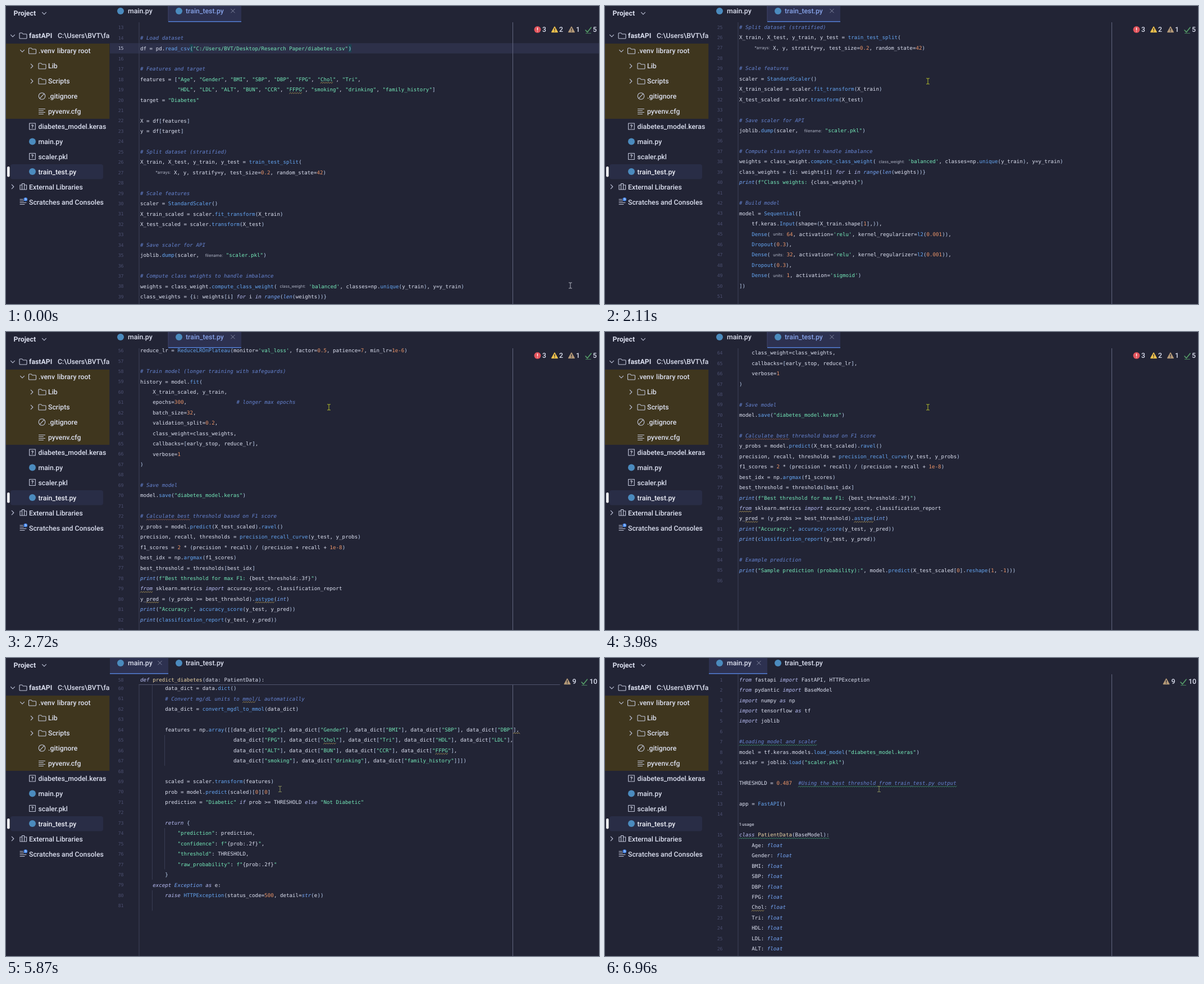
Write an HTML page that moves like this. It is 1056x531 px and loops after 8000 ms.

```html
<!DOCTYPE html>
<html lang="en">
<head>
<meta charset="utf-8">
<title>Code editor</title>
<style>
html, body { margin: 0; width: 100%; height: 100%; overflow: hidden; background: #222435; }
svg { display: block; width: 1056px; height: 531px; }
text { white-space: pre; text-rendering: geometricPrecision; }
.code { font: 9.19px "DejaVu Sans Mono", "Noto Sans Mono", monospace; }
.num { font: 8.2px "DejaVu Sans Mono", "Noto Sans Mono", monospace; text-anchor: end; }
.ui { font: 500 12.3px Roboto, Inter, sans-serif; }
.bold { font-weight: 700; }
.hint { font: 7.3px Inter, sans-serif; }
.usage { font: 600 7.3px Inter, sans-serif; }
.it { font-style: italic; }
</style>
</head>
<body>
<svg id="stage" viewBox="0 0 1056 531"></svg>
<script>
const LOOP = 8000, ROW = 18.44, CW = 5.533, LEFT = 239, TOP = 38.5;
const BG = '#222435', FG = '#dce0f0', LINE = '#50546d';
const INK = { comment: '#6583d0', string: '#74e8b8', number: '#ea9468', key: '#b8bdf4',
  builtin: '#74a5f6', call: '#64a5f2', name: '#ead4a6', bracket: '#bcd0f0', gutter: '#4b4f70' };
const RED = '#d8505c', OCHRE = '#b9a05a', GREEN = '#3f9d72', RUST = '#96604f';
const KEYS = new Set('import from as for in if else return def class try except raise'.split(' '));
const BUILTINS = new Set('print range len float int str Exception'.split(' '));

const TRAIN = `import pandas as pd
import numpy as np
import tensorflow as tf
from tensorflow.keras.models import Sequential
from tensorflow.keras.layers import Dense, Dropout
from tensorflow.keras.regularizers import l2
from tensorflow.keras.callbacks import EarlyStopping, ReduceLROnPlateau
from sklearn.model_selection import train_test_split
from sklearn.preprocessing import StandardScaler
from sklearn.utils import class_weight
import joblib
from sklearn.metrics import precision_recall_curve

# Load dataset
df = pd.read_csv("C:/Users/BVT/Desktop/Research Paper/diabetes.csv")

# Features and target
features = ["Age", "Gender", "BMI", "SBP", "DBP", "FPG", "Chol", "Tri",
            "HDL", "LDL", "ALT", "BUN", "CCR", "FFPG", "smoking", "drinking", "family_history"]
target = "Diabetes"

X = df[features]
y = df[target]

# Split dataset (stratified)
X_train, X_test, y_train, y_test = train_test_split(
    ~*arrays:~X, y, stratify=y, test_size=0.2, random_state=42)

# Scale features
scaler = StandardScaler()
X_train_scaled = scaler.fit_transform(X_train)
X_test_scaled = scaler.transform(X_test)

# Save scaler for API
joblib.dump(scaler, ~filename:~"scaler.pkl")

# Compute class weights to handle imbalance
weights = class_weight.compute_class_weight(~class_weight:~'balanced', classes=np.unique(y_train), y=y_train)
class_weights = {i: weights[i] for i in range(len(weights))}
print(f"Class weights: {class_weights}")

# Build model
model = Sequential([
    tf.keras.Input(shape=(X_train.shape[1],)),
    Dense(~units:~64, activation='relu', kernel_regularizer=l2(0.001)),
    Dropout(0.3),
    Dense(~units:~32, activation='relu', kernel_regularizer=l2(0.001)),
    Dropout(0.3),
    Dense(~units:~1, activation='sigmoid')
])

# Callbacks
early_stop = EarlyStopping(
    monitor='val_loss', patience=15, restore_best_weights=True
)
reduce_lr = ReduceLROnPlateau(monitor='val_loss', factor=0.5, patience=7, min_lr=1e-6)

# Train model (longer training with safeguards)
history = model.fit(
    X_train_scaled, y_train,
    epochs=300,                # longer max epochs
    batch_size=32,
    validation_split=0.2,
    class_weight=class_weights,
    callbacks=[early_stop, reduce_lr],
    verbose=1
)

# Save model
model.save("diabetes_model.keras")

# Calculate best threshold based on F1 score
y_probs = model.predict(X_test_scaled).ravel()
precision, recall, thresholds = precision_recall_curve(y_test, y_probs)
f1_scores = 2 * (precision * recall) / (precision + recall + 1e-8)
best_idx = np.argmax(f1_scores)
best_threshold = thresholds[best_idx]
print(f"Best threshold for max F1: {best_threshold:.3f}")
from sklearn.metrics import accuracy_score, classification_report
y_pred = (y_probs >= best_threshold).astype(int)
print("Accuracy:", accuracy_score(y_test, y_pred))
print(classification_report(y_test, y_pred))

# Example prediction
print("Sample prediction (probability):", model.predict(X_test_scaled[0].reshape(1, -1)))
`;

const MAIN = `from fastapi import FastAPI, HTTPException
from pydantic import BaseModel
import numpy as np
import tensorflow as tf
import joblib

#Loading model and scaler
model = tf.keras.models.load_model("diabetes_model.keras")
scaler = joblib.load("scaler.pkl")

THRESHOLD = 0.487  #Using the best threshold from train_test.py output

app = FastAPI()

class PatientData(BaseModel):
${'Age Gender BMI SBP DBP FPG Chol Tri HDL LDL ALT BUN CCR FFPG smoking drinking family_history'
  .split(' ').map(f => `    ${f}: float`).join('\n')}


def convert_mgdl_to_mmol(data):
    # Glucose
    if data["FPG"] > 30:
        data["FPG"] = data["FPG"] / 18.0
    if data["FFPG"] > 30:
        data["FFPG"] = data["FFPG"] / 18.0

    # Cholesterol
    if data["Chol"] > 20:
        data["Chol"] = data["Chol"] / 38.67
    if data["HDL"] > 10:
        data["HDL"] = data["HDL"] / 38.67
    if data["LDL"] > 15:
        data["LDL"] = data["LDL"] / 38.67

    # Triglycerides
    if data["Tri"] > 20:
        data["Tri"] = data["Tri"] / 88.57

    return data


@app.post("/predict")
def predict_diabetes(data: PatientData):
    try:
        data_dict = data.dict()
        # Convert mg/dL units to mmol/L automatically
        data_dict = convert_mgdl_to_mmol(data_dict)

        features = np.array([[data_dict["Age"], data_dict["Gender"], data_dict["BMI"], data_dict["SBP"], data_dict["DBP"],
                              data_dict["FPG"], data_dict["Chol"], data_dict["Tri"], data_dict["HDL"], data_dict["LDL"],
                              data_dict["ALT"], data_dict["BUN"], data_dict["CCR"], data_dict["FFPG"],
                              data_dict["smoking"], data_dict["drinking"], data_dict["family_history"]]])

        scaled = scaler.transform(features)
        prob = model.predict(scaled)[0][0]
        prediction = "Diabetic" if prob >= THRESHOLD else "Not Diabetic"

        return {
            "prediction": prediction,
            "confidence": f"{prob:.2f}",
            "threshold": THRESHOLD,
            "raw_probability": f"{prob:.2f}"
        }
    except Exception as e:
        raise HTTPException(status_code=500, detail=str(e))
`;

// SVG helpers
const stage = document.getElementById('stage');
function el(parent, tag, attrs = {}, content) {
  const node = document.createElementNS('http://www.w3.org/2000/svg', tag);
  for (const k in attrs) node.setAttribute(k, attrs[k]);
  if (content !== undefined) node.textContent = content;
  return parent.appendChild(node);
}
const group = (parent, attrs) => el(parent, 'g', attrs);
const rect = (p, x, y, width, height, fill, rx = 0) => el(p, 'rect', { x, y, width, height, fill, rx });
const path = (p, d, stroke, w = 1.1, fill = 'none') =>
  el(p, 'path', { d, stroke, 'stroke-width': w, fill, 'stroke-linecap': 'round', 'stroke-linejoin': 'round' });
const label = (p, x, y, s, cls = 'ui', fill = FG) => el(p, 'text', { x, y: y + 4.3, class: cls, fill }, s);
const dot = (p, cx, cy, r, fill) => el(p, 'circle', { cx, cy, r, fill });
const show = (node, on) => node.setAttribute('display', on ? 'inline' : 'none');

const ruler = document.createElement('canvas').getContext('2d');
ruler.font = '7.3px Inter, sans-serif';

// Draws one line of highlighted code centred on y
const TOKEN = /(#.*)|(f?"[^"]*"|'[^']*')|~([^~]+)~|([A-Za-z_]\w*)|(\d[\d.]*(?:e-\d)?)|([()[\]{}]+)|(\s+)|([^\w\s()[\]{}"'#~]+)/g;
function codeLine(p, src, y) {
  let x = LEFT, prev = '';
  const put = (s, fill, italic) => {
    el(p, 'text', { x, y: y + 3.2, fill, class: italic ? 'code it' : 'code' }, s);
    x += s.length * CW;
  };
  for (const m of src.matchAll(TOKEN)) {
    const [s, comment, string, hint, word, number, bracket, space] = m;
    if (space) x += s.length * CW;
    else if (comment) put(s, INK.comment, true);
    else if (string && s[0] === 'f')
      s.split(/(\{[^}]*\})/).filter(Boolean).forEach(part => put(part, part[0] === '{' ? FG : INK.string));
    else if (string) put(s, INK.string);
    else if (hint) {
      el(p, 'text', { x: x + 5, y: y + 2.6, fill: '#b0b5c6', class: 'hint' }, hint);
      x += ruler.measureText(hint).width + 10.5;
    }
    else if (word) {
      const called = src[m.index + s.length] === '(';
      if (KEYS.has(s)) put(s, INK.key, true);
      else if (BUILTINS.has(s)) put(s, INK.builtin, true);
      else if (prev === 'def' || prev === 'class') put(s, INK.name);
      else put(s, called ? INK.call : FG);
      prev = s;
    }
    else put(s, number ? INK.number : bracket ? INK.bracket : FG);
  }
}

function squiggle(p, col, len, y, color) {
  const x0 = LEFT + col * CW, n = Math.round(len * CW / 2);
  let d = `M${x0} ${y + 7}`;
  for (let i = 1; i <= n; i++) d += `l2 ${i % 2 ? -1.8 : 1.8}`;
  path(p, d, color, 0.8);
}

// A file: text, lines that carry a usage note, squiggles, indent guides
function makeFile(parent, src, { usages = [], marks = [], guides = [], caret } = {}) {
  const g = group(parent), lines = src.split('\n');
  const rowY = n => TOP + (n - 1 + usages.filter(u => u <= n).length) * ROW;
  if (caret) {
    rect(g, 185, rowY(caret) - 9.2, 871, 18.4, '#2d3049');
    for (const col of [16, 67]) rect(g, LEFT + col * CW, rowY(caret) - 7, CW, 14, '#1a4350');
  }
  for (const [col, a, b] of guides)
    rect(g, LEFT + col * CW - 1.2, rowY(a) - 9, 1, rowY(b) - rowY(a) + 18, '#3a3d55');
  lines.forEach((s, i) => {
    const n = i + 1, y = rowY(n);
    el(g, 'text', { x: 209.5, y: y + 3, class: 'num', fill: n === caret ? '#c5cae0' : INK.gutter }, n);
    codeLine(g, s, y);
  });
  for (const u of usages) label(g, LEFT, rowY(u) - ROW - 1.5, '1 usage', 'usage', '#c0c4d4');
  for (const [n, word, color] of marks)
    squiggle(g, lines[n - 1].lastIndexOf(word), word.length, rowY(n), color);
  return { g, lines, rowY };
}

// Editor
rect(stage, 0, 0, 1056, 531, BG);
const defs = el(stage, 'defs');
rect(el(defs, 'clipPath', { id: 'pane' }), 185, 29, 871, 502);
rect(el(defs, 'clipPath', { id: 'tree' }), 0, 0, 184.5, 531);
const pane = group(stage, { 'clip-path': 'url(#pane)' });

const train = makeFile(pane, TRAIN, {
  caret: 15,
  marks: [[4, 'Sequential', RED], [7, 'EarlyStopping', RED], [7, 'ReduceLROnPlateau', RED],
    [18, 'Chol', OCHRE], [19, 'FFPG', OCHRE], [72, 'Calculate best', RUST],
    [79, 'from', OCHRE], [80, 'pred', OCHRE], [80, 'astype', OCHRE]]
});
const main = makeFile(pane, MAIN, {
  usages: [15, 35],
  marks: [[7, '#Loading model and scaler', GREEN],
    [11, '#Using the best threshold from train_test.py output', GREEN],
    [15, 'class PatientData(BaseModel):', GREEN], [22, 'Chol', OCHRE], [61, 'mmol', OCHRE],
    [64, '],', OCHRE], [65, 'Chol', OCHRE], [66, 'FFPG', OCHRE]],
  guides: [[4, 60, 78], [4, 80, 81], [8, 65, 67], [8, 74, 77]]
});
rect(pane, 236.5, 29, 1, 502, '#3f425a');
rect(pane, 902, 29, 1, 502, '#62667f');

const sticky = [[15, 32], [35, 54], [58, 81]].map(([a, b]) => {
  const g = group(pane);
  rect(g, 185, 29, 802, 18.5, BG);
  rect(g, 236.5, 47, 750, 1, LINE);
  el(g, 'text', { x: 209.5, y: TOP + 3, class: 'num', fill: INK.gutter }, a);
  codeLine(g, main.lines[a - 1], TOP);
  return { g, a, b };
});

// Problem counters
function warning(p, x, fill) {
  path(p, `M${x} 37.2l5.2 9.4h-10.4z`, fill, 1.5, fill);
  path(p, `M${x} 40v3.2m0 2v.2`, BG, 1.3);
}
function check(p, x) {
  path(p, `M${x - 5} 43l3.4 3.6l6.6-8.4`, '#57a06a', 1.6);
  path(p, `M${x - 4.5} 48.6h9`, '#57a06a', 0.8);
}
const trainInfo = group(stage), mainInfo = group(stage);
dot(trainInfo, 946.5, 42, 6, '#e2545c');
path(trainInfo, 'M946.5 39v3.5m0 2.4v.2', '#fff', 1.4);
warning(trainInfo, 977, '#efc24c');
warning(trainInfo, 1007, '#b59a78');
check(trainInfo, 1037);
[[955, 3], [985, 2], [1015, 1], [1045, 5]].forEach(([x, n]) => label(trainInfo, x, 42, n));
warning(mainInfo, 999.5, '#b59a78');
check(mainInfo, 1030);
label(mainInfo, 1008.5, 42, 9);
label(mainInfo, 1039, 42, 10);

// Tabs
const cross = (p, x) => path(p, `M${x - 3.3} 5.4l6.6 6.6m0-6.6l-6.6 6.6`, '#80859f', 1);
const pyDot = (p, x, y) => dot(p, x, y, 6, '#4b8bbe');
function tabBack(x, w, fill) {
  const g = group(stage);
  rect(g, x, 0, w, 27.5, fill);
  return g;
}
const mainHover = tabBack(185, 104, '#2a2d47');
const mainOn = tabBack(185, 104, '#2d3150');
const trainOn = tabBack(289, 130, '#2d3150');
rect(mainOn, 185, 27, 104, 1.5, '#5580d8');
rect(trainOn, 289, 27, 130, 1.5, '#5580d8');
rect(trainOn, 288.5, 0, 1, 27, '#41456a');
cross(mainHover, 274);
cross(mainOn, 274);
cross(trainOn, 404);
pyDot(stage, 204, 9);
pyDot(stage, 308, 9);
label(stage, 217, 8.7, 'main.py');
const trainTab = label(stage, 320, 8.7, 'train_test.py');

// Project tree
const side = group(stage, { 'clip-path': 'url(#tree)' });
const down = (x, y) => path(side, `M${x - 3.5} ${y - 1.7}l3.5 3.5l3.5-3.5`, '#b5bad0', 1.2);
const right = (x, y) => path(side, `M${x - 1.7} ${y - 3.7}l3.5 3.7l-3.5 3.7`, '#b5bad0', 1.2);
const folder = (x, y) =>
  path(side, `M${x} ${y - 4}q0-1 1-1h3.6l1.7 2h5.7q1 0 1 1v6q0 1-1 1h-11q-1 0-1-1z`, '#c3c8dc', 1.1);
const bars = (x, y) => path(side, `M${x} ${y - 4.5}h11m-11 3h8m-8 3h11m-11 3h8`, '#c3c8dc', 1.1);
function unknown(x, y) {
  path(side, `M${x - 5.3} ${y - 5.5}h10.6v11h-10.6z`, '#c3c8dc', 1.1);
  el(side, 'text', { x, y: y + 3.3, class: 'ui bold', 'text-anchor': 'middle', fill: FG, style: 'font-size:9px' }, '?');
}
rect(side, 0, 67, 184.5, 134, '#3f361e');
rect(side, 8, 282, 165, 26.5, '#292d46', 4);
rect(side, 2, 286, 4.6, 18.5, '#f4f5fa', 2);
label(side, 13.5, 13, 'Project', 'ui bold');
down(68, 13);
down(12, 53); folder(24, 53);
label(side, 41, 53, 'fastAPI', 'ui bold');
label(side, 92, 53, 'C:\\Users\\BVT\\fa');
down(29, 80); folder(40.5, 80);
label(side, 58, 80, '.venv'); label(side, 91, 80, 'library root');
right(46, 107); folder(58, 107); label(side, 75, 107, 'Lib');
right(46, 134); folder(58, 134); label(side, 75, 134, 'Scripts');
el(side, 'circle', { cx: 64, cy: 160.5, r: 5.8, fill: 'none', stroke: '#c3c8dc', 'stroke-width': 1.1 });
path(side, 'M60 164.6l8-8.2', '#c3c8dc');
label(side, 75, 161, '.gitignore');
bars(58.5, 188); label(side, 75, 188, 'pyvenv.cfg');
unknown(47, 214.5); label(side, 57.5, 215, 'diabetes_model.keras');
pyDot(side, 47, 241.5); label(side, 57.5, 242, 'main.py');
unknown(47, 268); label(side, 57.5, 268.5, 'scaler.pkl');
pyDot(side, 47, 295); label(side, 57.5, 295.5, 'train_test.py', 'ui', '#f0f2fa');
right(12, 322);
path(side, 'M25 319h3.6v8h-3.6zM28.6 316.5h4v10.5h-4zM32.6 319h4v8h-4z', '#c3c8dc', 1.1);
label(side, 41, 322.5, 'External Libraries');
bars(25, 349);
dot(side, 34.8, 344.5, 4.2, BG);
dot(side, 34.8, 344.5, 3.3, '#4c8df0');
path(side, 'M34.8 342.8v1.9h1.3', '#fff', 0.8);
label(side, 41, 349.5, 'Scratches and Consoles');

// Mouse pointer
const beam = path(stage, 'M-2.5-5h1.7l.8.6l.8-.6h1.7M0-4.5v9M-2.5 5h1.7l.8-.6l.8.6h1.7', FG, 0.9);
const arrow = path(stage, 'M0 0v9l2.1-1.9l1.5 3.2l1.5-.7l-1.5-3.1h2.7z', '#15161f', 0.7, '#d5dc3a');

// Motion: [start, end, pictures] of each burst; between bursts everything rests
const BURSTS = [[30, 100, 2], [380, 520, 3], [1040, 1230, 4], [1910, 2660, 12], [2720, 3050, 6],
  [3980, 4380, 7], [4650, 5400, 12], [5460, 5870, 7], [6360, 6960, 10]];
const SWITCH = 5460;
const POINTER = [[0, 1005, 498], [30, 850, 345], [100, 717, 209], [310, 717, 209], [520, 751, -14],
  [1030, 690, -14], [1040, 690, 4], [1230, 575, 134], [4582, 575, 134], [4786, 277, 8],
  [5000, 272, 9], [5400, 240, 9], [5460, 240, 9], [5870, 488, 233.5]];
const TRAIN_SCROLL = [[0, 221.3], [1842, 221.3], [2114, 443], [2720, 1019.6], [3050, 1164.7],
  [3979, 1164.7], [3980, 1163], [4380, 0, 1]];
const MAIN_SCROLL = [[0, 1109.3], [6293, 1109.3], [6960, 0, 1]];

function snap(t) {
  const burst = BURSTS.filter(b => b[0] <= t).pop();
  if (!burst) return 0;
  const [a, b, n] = burst, d = (b - a) / (n - 1);
  return Math.min(b, a + Math.floor((t - a) / d + 0.1) * d);
}

// Value of column c at t; a trailing 1 in the key smooths that leg
function at(keys, t, c = 1) {
  const i = keys.findIndex(k => k[0] >= t);
  if (i < 0) return keys[keys.length - 1][c];
  if (i === 0) return keys[0][c];
  const a = keys[i - 1], b = keys[i];
  let u = (t - a[0]) / (b[0] - a[0]);
  if (c === 1 && b[2] === 1) u = u * u * (3 - 2 * u);
  return a[c] + (b[c] - a[c]) * u;
}

function render(t) {
  const q = snap(t), onMain = t >= SWITCH;
  const file = onMain ? main : train;
  const scroll = at(onMain ? MAIN_SCROLL : TRAIN_SCROLL, q);
  file.g.setAttribute('transform', `translate(0 ${-scroll})`);
  show(train.g, !onMain); show(main.g, onMain);
  show(trainInfo, !onMain); show(mainInfo, onMain);
  show(trainOn, !onMain); show(mainOn, onMain);
  trainTab.setAttribute('fill', onMain ? FG : '#86a2e8');
  for (const { g, a, b } of sticky)
    show(g, onMain && main.rowY(a) - scroll < TOP - 1 && main.rowY(b) - scroll > 47);

  const x = at(POINTER, q, 1), y = at(POINTER, q, 2);
  const overTabs = t > 4600 && y < 28;
  show(mainHover, overTabs && !onMain);
  show(arrow, overTabs); show(beam, !overTabs);
  (overTabs ? arrow : beam).setAttribute('transform', `translate(${x} ${y})`);
  beam.setAttribute('stroke', t < 1040 ? '#c4c8d2' : onMain ? '#989d60' : '#c6d02c');
}

const begin = performance.now();
function tick() {
  render((performance.now() - begin) % LOOP);
  requestAnimationFrame(tick);
}
tick();
</script>
</body>
</html>
```
